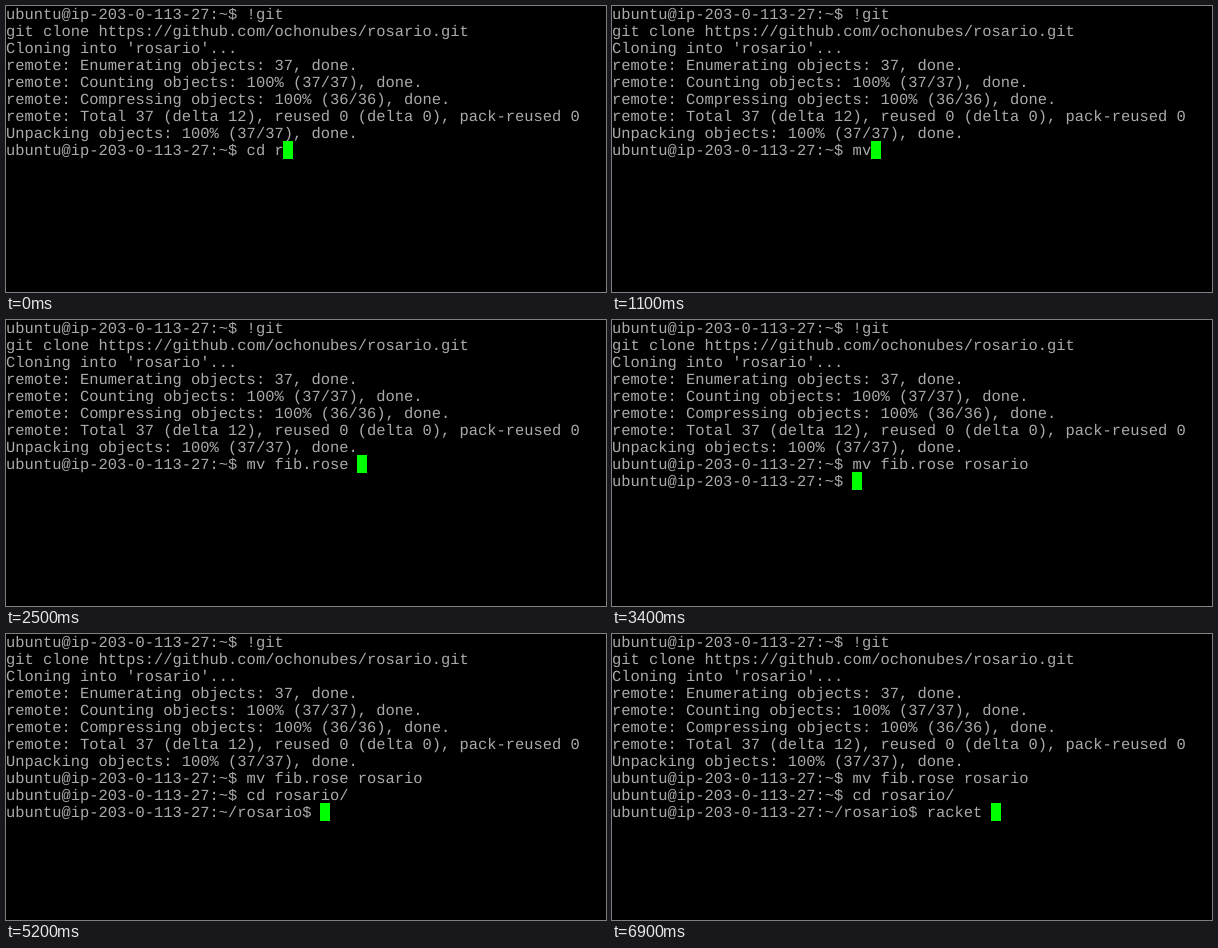
Write an HTML page that moves like this. It is 600x286 px and loops after 7000 ms.

```html
<!DOCTYPE html>
<html lang="en">
<head>
<meta charset="utf-8">
<title>Terminal session</title>
<style>
  html, body { margin: 0; width: 100%; height: 100%; overflow: hidden; background: #000; }
  pre {
    margin: 0;
    padding-top: 1px;
    color: #aaa;
    font: 15.43px/17px "Liberation Mono", "Courier New", monospace;
    text-rendering: geometricPrecision;
    font-variant-ligatures: none;
  }
  .cursor {
    display: inline-block;
    position: relative;
    top: -2px;
    left: -0.5px;
    width: 10px;
    height: 18px;
    margin-bottom: -1px;
    vertical-align: top;
    background: #0f0;
  }
</style>
</head>
<body>
<pre><span id="screen"></span><span class="cursor"></span></pre>
<script>
const LOOP = 7000;
const HOST = 'ubuntu@ip-203-0-113-27:';
const HOME = HOST + '~$ ';
const REPO = HOST + '~/rosario$ ';

const intro = `${HOME}!git
git clone https://github.com/ochonubes/rosario.git
Cloning into 'rosario'...
remote: Enumerating objects: 37, done.
remote: Counting objects: 100% (37/37), done.
remote: Compressing objects: 100% (36/36), done.
remote: Total 37 (delta 12), reused 0 (delta 0), pack-reused 0
Unpacking objects: 100% (37/37), done.
${HOME}`;
const moved = intro + 'mv fib.rose rosario\n' + HOME;
const inRepo = moved + 'cd rosario/\n' + REPO;

const steps = [];
const show = (at, text) => steps.push({ at, text });

// Types the keys one by one, 100 ms apart, after the given text.
function type(at, before, keys) {
  for (let n = 1; n <= keys.length; n++) {
    show(at + (n - 1) * 100, before + keys.slice(0, n));
  }
}

show(0, intro + 'cd r');
for (let n = 3; n >= 0; n--) show(800 - n * 100, intro + 'cd '.slice(0, n));
type(1000, intro, 'mv fib');
show(1600, intro + 'mv fib.rose ');
type(2600, intro + 'mv fib.rose ', 'rosario');
show(3400, moved);
type(3800, moved, 'cd ros');
show(4500, moved + 'cd rosario/');
show(4800, inRepo);
type(6100, inRepo, 'rac');
type(6500, inRepo + 'rac', 'ket ');

const screen = document.getElementById('screen');
let current;

function draw() {
  const t = performance.now() % LOOP;
  const step = steps.findLast(s => s.at <= t);
  if (step !== current) {
    current = step;
    screen.textContent = step.text;
  }
  requestAnimationFrame(draw);
}
draw();
</script>
</body>
</html>
```
